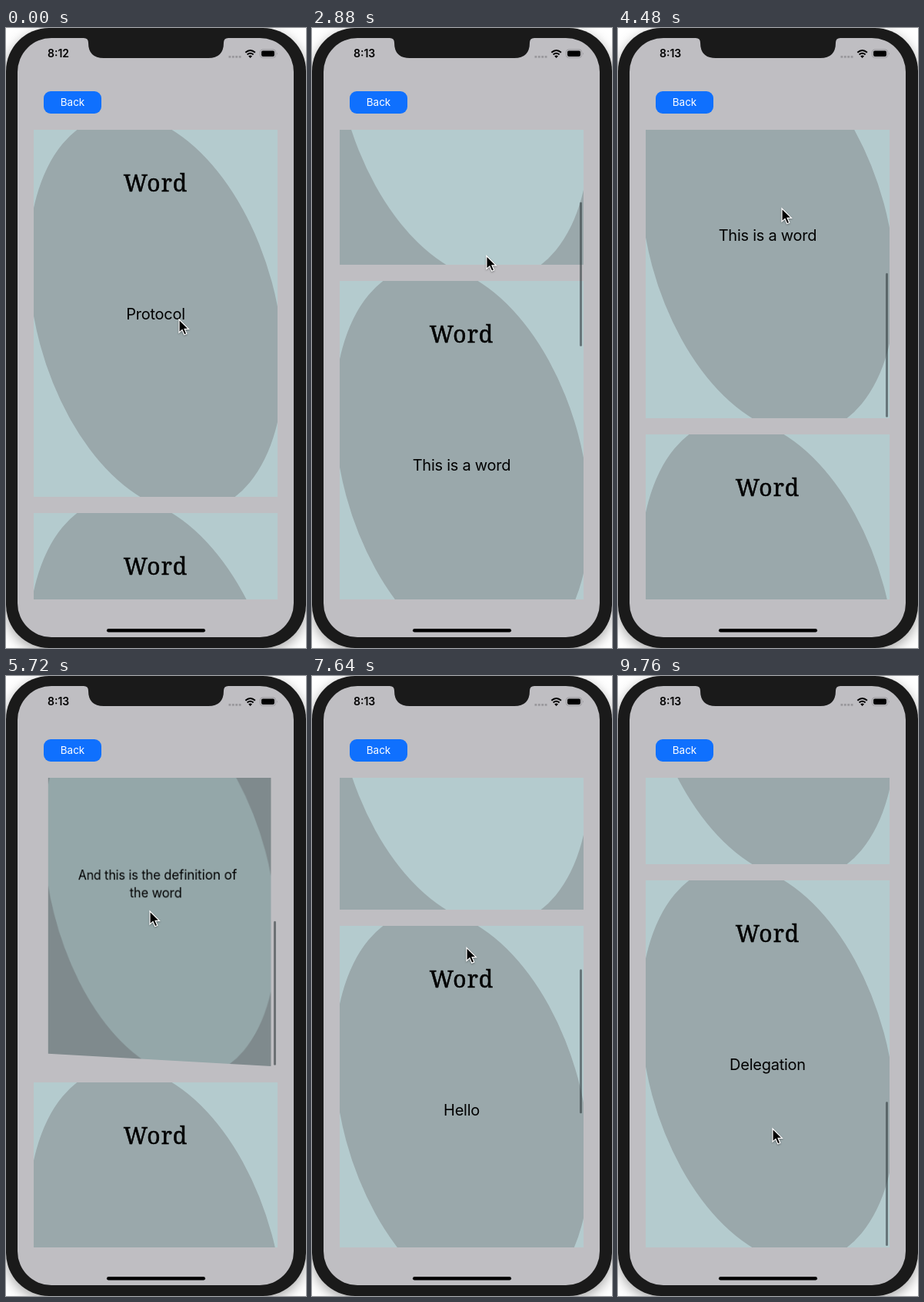
Recreate the animation shown at these times as an HTML page. Size 390 by 804 pixels, loop 9800 ms.

```html
<!DOCTYPE html>
<html lang="en">
<head>
<meta charset="utf-8">
<title>Flip cards</title>
<style>
html, body { margin: 0; width: 100%; height: 100%; overflow: hidden; background: #fff; }
body { position: relative; font-family: Inter, sans-serif; color: #000; }
body *, .face::before { position: absolute; box-sizing: border-box; }
#phone { left: 0; top: 0; width: 390px; height: 804px; border-radius: 56px; background: #1a1a1a;
  box-shadow: 0 5px 16px rgba(0, 0, 0, .35); }
#screen { left: 15px; top: 13px; width: 359px; height: 777px; border-radius: 44px; background: #bfbec2; }
#chrome { left: 0; top: 0; }
.clock { left: 54px; top: 24px; font: 600 14px/18px Inter, sans-serif; }
#back { left: 49px; top: 82px; width: 75px; height: 29px; border-radius: 9px; background: #0f70fe;
  color: #fff; font-size: 13.5px; line-height: 29px; text-align: center; }
#list { left: 36px; top: 132px; width: 317px; height: 609px; overflow: hidden; }
.face { left: 0; width: 317px; height: 476px; overflow: hidden; text-align: center; background: #b4cbce; }
.face::before { content: ""; left: 2.5px; top: -26px; width: 312px; height: 528px; border-radius: 50%;
  background: #9aa8ab; transform: rotate(-15.2deg); }
.face.reverse { background: #9aa8ab; }
.face.reverse::before { background: #b4cbce; }
.face h2 { left: 0; right: 0; top: 47px; margin: 0; font: 500 30px/44px "Noto Serif", serif;
  letter-spacing: 1px; -webkit-text-stroke: .5px #000; }
.face p { left: 0; right: 0; top: 239px; margin: 0; transform: translateY(-50%); font-size: 20px; line-height: 24px; letter-spacing: -.25px; }
.face.reverse p { font-size: 18.2px; letter-spacing: -.13px; }
#bar { left: 348px; top: 133px; width: 2.5px; height: 187px; border-radius: 2px; background: rgba(40, 50, 52, .55); }
#cursor { left: 0; top: 0; overflow: visible; filter: drop-shadow(0 1px 1px rgba(0, 0, 0, .35)); }
</style>
</head>
<body>
<div id="phone">
  <div id="screen"></div>
  <svg id="chrome" width="390" height="804">
    <path d="M101 13Q107 13 107 19Q107 39 127 39H263Q283 39 283 19Q283 13 289 13Z" fill="#1a1a1a"/>
    <path d="M289.5 37.3H306" stroke="#99989c" stroke-width="2.8" stroke-dasharray="2.8 1.6"/>
    <path d="M311.3 31.8Q317.6 26.2 323.9 31.8M313.6 34.5Q317.6 31 321.6 34.5" fill="none" stroke="#000" stroke-width="2"/>
    <path d="M315.2 36.4Q317.6 34.6 320 36.4L317.6 39Z"/>
    <rect x="330.5" y="28" width="20" height="10.4" rx="3" fill="none" stroke="#99989c"/>
    <rect x="332" y="29.5" width="17" height="7.4" rx="1.8"/>
    <path d="M352 31.5Q353.6 33.2 352 35Z" fill="#99989c"/>
    <rect x="131" y="779" width="128" height="4.6" rx="2.3"/>
  </svg>
  <div class="clock" id="before">8:12</div>
  <div class="clock" id="after">8:13</div>
  <div id="back">Back</div>
  <div id="list"></div>
  <div id="bar"></div>
  <svg id="cursor" width="14" height="22">
    <path d="M0 0V17L4 13.4L6.8 19.8L9.8 18.5L7.1 12.3H12.4Z" stroke="#fff" stroke-width="1.2"/>
  </svg>
</div>
<script>
const LOOP = 9800, PITCH = 497, FLIP = 300;
const $ = id => document.getElementById(id);

const cards = [
  { word: 'Protocol', meaning: 'A set of rules', flipAt: 650 },
  { word: 'This is a word', meaning: 'And this is the definition of<br>the word', flipAt: 5484 },
  { word: 'Hello' },
  { word: 'Delegation' }
];

function addFace(className, title, text) {
  const face = document.createElement('div');
  face.className = className;
  face.innerHTML = `<h2>${title}</h2><p>${text}</p>`;
  return $('list').appendChild(face);
}

for (const card of cards) {
  card.faces = [addFace('face', 'Word', card.word)];
  if (card.meaning) card.faces.push(addFace('face reverse', 'Description', card.meaning));
}

const clamp = x => Math.min(1, Math.max(0, x));
const ramp = (t, start, length) => clamp((t - start) / length);
const smooth = p => (1 - Math.cos(Math.PI * p)) / 2;
const fling = p => (1 - Math.exp(-4 * p)) / (1 - Math.exp(-4));

// Keys are [time, value, easing into this key]; linear by default.
function track(keys, t) {
  const n = keys.findIndex(key => key[0] > t);
  if (n === 0) return keys[0][1];
  if (n < 0) return keys[keys.length - 1][1];
  const [t0, a] = keys[n - 1], [t1, b, ease = p => p] = keys[n];
  return a + (b - a) * ease((t - t0) / (t1 - t0));
}

const scrollKeys = [
  [2350, 0], [2480, 40], [2880, 300.5], [3000, 365], [4460, 599, fling],
  [7310, 599], [7400, 640], [7640, 801], [7720, 855], [8110, 1050, fling],
  [8270, 1050], [8440, 1141], [9120, 1358, fling]
];
const cursorX = [
  [1200, 225], [1720, 220], [1880, 220], [1920, 218], [2340, 218], [2880, 227], [3000, 213],
  [4740, 213], [5000, 187, smooth], [6500, 187], [7160, 205, smooth], [7640, 201]
];
const cursorY = [
  [1100, 378], [1200, 413], [1640, 597], [1720, 612], [2340, 612], [2480, 557], [2880, 296], [3000, 234],
  [4740, 234], [5000, 305, smooth], [6500, 305], [7160, 628, smooth], [7300, 628], [7640, 353], [7720, 300],
  [7760, 300], [8110, 690, smooth], [8260, 690], [8440, 587]
];

// The card is pushed back so that its near edge stays in the screen plane.
function turn(card, t) {
  const angle = 180 * smooth(ramp(t, card.flipAt, FLIP));
  const depth = Math.sin(angle * Math.PI / 180);
  const moving = depth > .001;
  card.faces.forEach((face, side) => {
    face.style.visibility = (angle >= 90) === (side === 1) ? 'visible' : 'hidden';
    face.style.transform = moving
      ? `perspective(1400px) translateZ(${-158.5 * depth}px) rotateY(${angle - 180 * side}deg)` : 'none';
    face.style.filter = moving ? `brightness(${1 - .55 * depth})` : 'none';
  });
}

function draw(t) {
  const offset = track(scrollKeys, t);
  cards.forEach((card, i) => {
    for (const face of card.faces) face.style.top = i * PITCH - offset + 'px';
    if (card.meaning) turn(card, t);
  });
  const tick = ramp(t, 300, 160);
  $('before').style.opacity = 1 - tick;
  $('after').style.opacity = tick;
  $('bar').style.transform = `translateY(${offset * .3085}px)`;
  $('bar').style.opacity = t < 7000 ? ramp(t, 2350, 80) - ramp(t, 6560, 300) : ramp(t, 7310, 80);
  $('cursor').style.transform = `translate(${track(cursorX, t)}px, ${track(cursorY, t)}px)`;
}

const start = performance.now();
function frame() {
  draw((performance.now() - start) % LOOP);
  requestAnimationFrame(frame);
}
frame();
</script>
</body>
</html>
```
